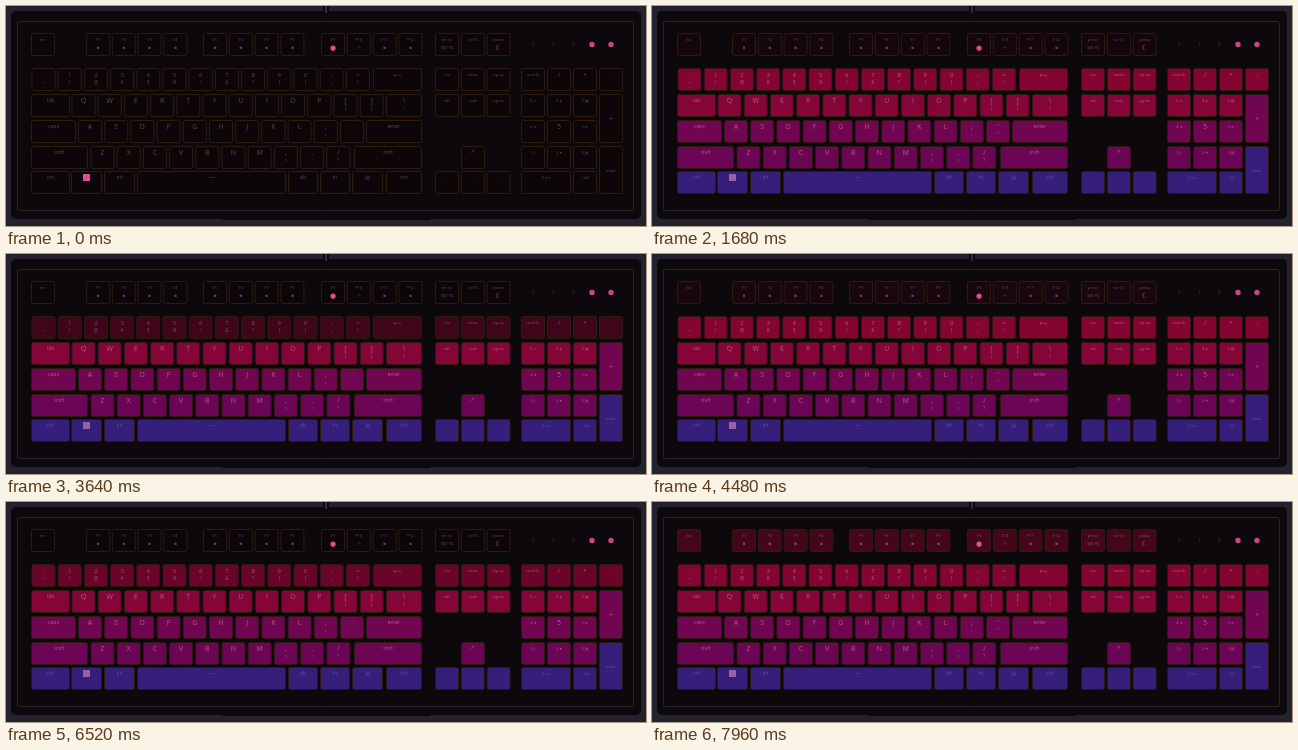
An HTML page with a canvas that plays this animation: 640 by 220 pixels, repeating every 8000 ms.

```html
<!DOCTYPE html>
<html lang="en">
<head>
<meta charset="utf-8">
<title>Keyboard audio meter</title>
<style>
  html, body { margin: 0; width: 100%; height: 100%; overflow: hidden; background: #232230; }
  canvas { display: block; }
</style>
</head>
<body>
<canvas id="stage" width="640" height="220"></canvas>
<script>
const ctx = document.getElementById('stage').getContext('2d');
const LOOP = 8000, BEAT = 500;
const PITCH = 26.2, KEY = 24;

// Rows from bottom to top
const rowTop = [165, 140, 114, 88, 62, 27];
const rowColor = [[54, 31, 122], [107, 5, 86], [112, 5, 82], [133, 5, 56], [133, 5, 50], [137, 9, 45]];
const OFF = [13, 6, 9];
const keys = [];

function key(row, x, w, label, sub = '', h = 23) {
  keys.push({ row, x, y: rowTop[row], w, h, label, sub });
}
function run(row, x, labels, subs = '', pitch = PITCH) {
  labels.forEach((label, i) => key(row, x + i * pitch, KEY, label, subs[i]));
}

// Main block
key(5, 25, KEY, 'esc');
[[80, 1], [197, 5], [315, 9]].forEach(([x, first]) =>
  run(5, x, [0, 1, 2, 3].map(i => 'F' + (first + i)), first === 9 ? ['●', '☼', '▪', '▪'] : '▪▪▪▪', 25.8));
run(4, 25.5, [...'`1234567890-='], '~!@#$%^&*()_+');
key(4, 367, 49, '⟵');
key(3, 25, 39, 'tab');
run(3, 65.5, [...'QWERTYUIOP[]'], '          {}');
key(3, 380, 36, '\\', '|');
key(2, 25, 45, 'caps');
run(2, 72, [...'ASDFGHJKL;\''], '         :"');
key(2, 360, 56, 'enter');
key(1, 25, 57, 'shift');
run(1, 84.5, [...'ZXCVBNM,./'], '       <>?');
key(1, 348, 68, 'shift');
key(0, 25, 39, 'ctrl');
key(0, 65, 31, '■');
key(0, 98, 31, 'alt');
key(0, 131, 149, '──');
key(0, 282, 30, 'alt');
key(0, 314, 30, 'fn');
key(0, 346, 31, '▤');
key(0, 380, 36, 'ctrl');

// Navigation block
run(5, 429, ['prt sc', 'scr lk', 'pause'], ['sys rq', '', '☾'], 25.8);
run(4, 429, ['ins', 'home', 'pg up'], '', 25.8);
run(3, 429, ['del', 'end', 'pg dn'], '', 25.8);
key(1, 455, KEY, '^');
run(0, 429, ['‹', '˅', '›'], '', 25.8);

// Number pad
run(4, 515, ['num lk', '/', '*', '-'], '', 26);
run(3, 515, ['7ₕₒₘ', '8 ▴', '9 ▤'], '', 26);
key(2, 593, KEY, '+', '', 23);
Object.assign(keys[keys.length - 1], { y: rowTop[3], h: 49 });
run(2, 515, ['4 ◂', '5', '6 ▸'], '', 26);
run(1, 515, ['1ₑₙ', '2 ▾', '3 ▤'], '', 26);
key(0, 515, 50, '0 ins');
key(0, 567, KEY, '. del');
key(0, 593, KEY, 'enter');
Object.assign(keys[keys.length - 1], { y: rowTop[1], h: 48 });

const clamp = v => Math.max(0, Math.min(1, v));
const mix = (a, b, k) => `rgb(${a.map((v, i) => Math.round(v + (b[i] - v) * k))})`;

function track(points, t) {
  const i = points.findIndex(p => p[0] >= t);
  if (i < 1) return points[0][1];
  const [t0, v0] = points[i - 1], [t1, v1] = points[i];
  return v0 + (v1 - v0) * (t - t0) / (t1 - t0);
}

// Sound level in rows: a sharp rise on each beat, then a fall
const pulse = [[0, 4.8], [60, 4.72], [140, 4.4], [240, 6], [460, 5.45], [500, 4.8]];
function level(t) {
  return t < 240 ? 6 * clamp((t - 60) / 180) : track(pulse, t % BEAT);
}

function box(x, y, w, h, r, fill, stroke) {
  ctx.beginPath();
  ctx.roundRect(x, y, w, h, r);
  if (fill) { ctx.fillStyle = fill; ctx.fill(); }
  if (stroke) { ctx.strokeStyle = stroke; ctx.stroke(); }
}

function text(str, x, y, size, color) {
  ctx.font = `${size}px "Open Sans", "DejaVu Sans", sans-serif`;
  ctx.fillStyle = color;
  ctx.fillText(str, x, y);
}

function drawCase() {
  ctx.fillStyle = '#232230';
  ctx.fillRect(0, 0, 640, 220);
  box(5, 5, 630, 208, 5, '#0c080b');
  ctx.fillStyle = '#0c080b';
  ctx.fillRect(317, 0, 6, 8);
  ctx.fillRect(216, 211, 208, 3);
  ctx.fillStyle = '#302d3a';
  ctx.fillRect(319, 0, 2, 7);
  box(11.5, 15.5, 616, 189, 1, null, '#25222d');
  ['☾', '♪', '♫'].forEach((mark, i) => text(mark, 528 + i * 19.5, 39, 5, '#48424c'));
  [586, 605].forEach(x => {
    ctx.beginPath();
    ctx.arc(x, 38.5, 2.7, 0, 7);
    ctx.fillStyle = '#cb4683';
    ctx.fill();
  });
}

function drawKey(k, lvl) {
  const lit = clamp(lvl - k.row);
  const ink = mix([82, 76, 82], k.row ? [188, 88, 125] : [112, 75, 148], lit);
  const edge = mix([46, 29, 15], [49, 25, 16], lit);
  box(k.x + .5, k.y + .5, k.w - 1, k.h - 1, 2, mix(OFF, rowColor[k.row], lit), edge);

  const cx = k.x + k.w / 2;
  const single = k.label.length === 1;
  const small = k.row === 5 || k.row === 0;
  const y = k.h > 30 ? k.y + 25 : k.y + 7;
  if (k.label === '■') {
    ctx.fillStyle = mix([225, 75, 145], [150, 100, 165], lit);
    ctx.fillRect(cx - 3.5, k.y + 3, 7, 7);
  } else {
    const size = single && !small ? (k.row === 4 ? 6 : 7) : k.label.includes(' ') || k.w <= KEY ? 4 : 5;
    text(k.label, cx, y, size, ink);
  }
  if (k.sub && k.sub !== ' ') {
    const accent = '●☾'.includes(k.sub);
    text(k.sub, cx, k.y + 15, accent ? 7 : 4.5, accent ? mix([225, 75, 145], [195, 105, 135], lit) : ink);
  }
}

function frame(now) {
  const lvl = level(now % LOOP);
  ctx.textAlign = 'center';
  ctx.textBaseline = 'middle';
  ctx.lineWidth = 1;
  drawCase();
  keys.forEach(k => drawKey(k, lvl));
  requestAnimationFrame(() => frame(performance.now()));
}
frame(0);
</script>
</body>
</html>
```
